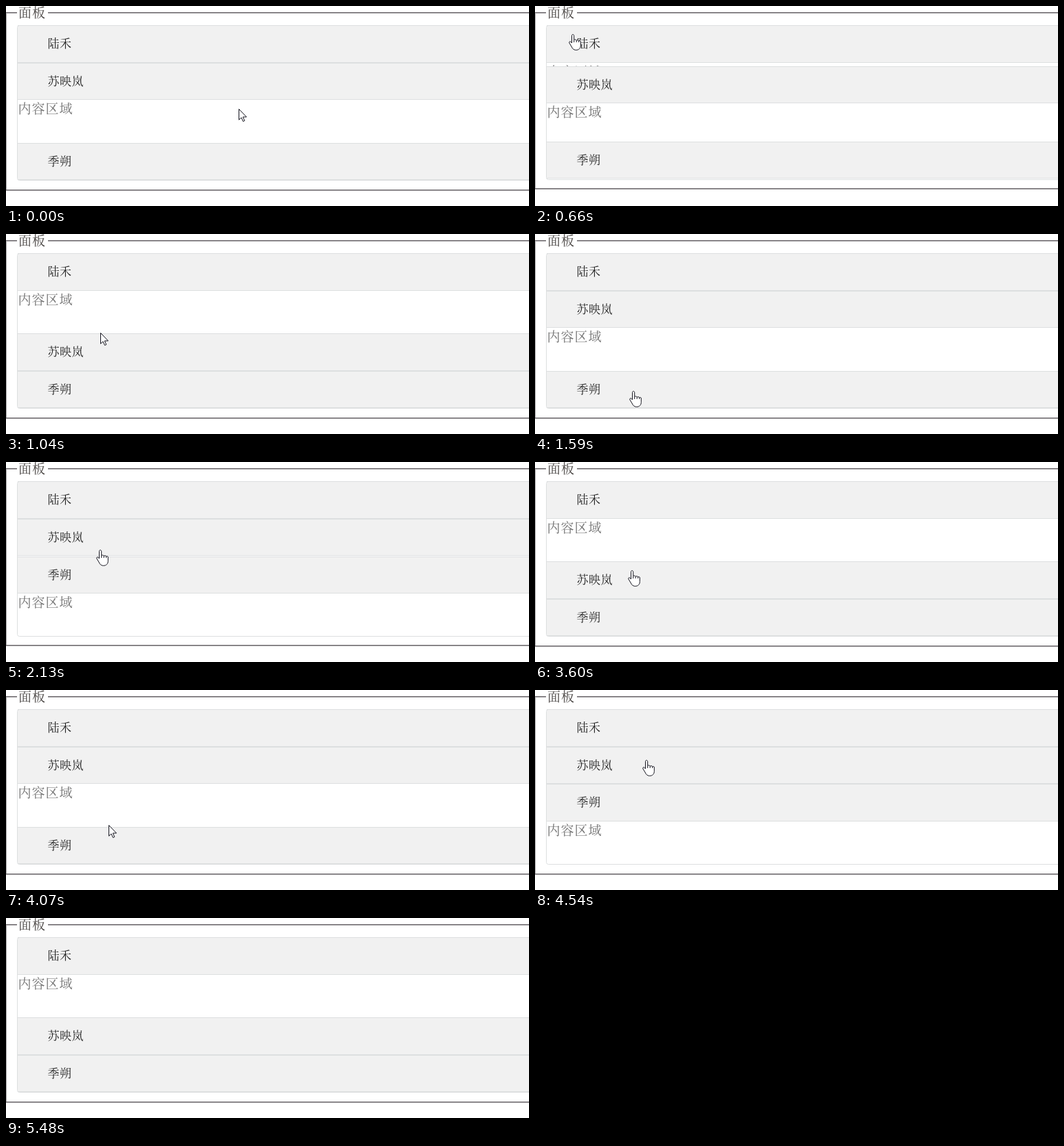
An HTML page that plays this animation: 760x292 px, repeating every 5.7 s.

```html
<!DOCTYPE html>
<html lang="zh-CN">
<head>
<meta charset="utf-8">
<title>面板</title>
<style>
html, body { margin: 0; width: 100%; height: 100%; overflow: hidden; background: #fff; }
#stage { display: block; width: 760px; height: 292px; }
text { font-family: "Noto Serif CJK SC", "Noto Sans CJK SC", "Noto Sans CJK", serif; }
.name { font-size: 17px; letter-spacing: .5px; fill: #222; }
.body { font-size: 19px; letter-spacing: 1px; fill: #707070; }
.legend { font-size: 19px; letter-spacing: 1px; fill: #4a4644; }
.rule { fill: #dddfe0; }
.dark { fill: #6b676b; }
.light { fill: #a9a7a9; }
.cursor path { fill: #fff; stroke: #14141e; stroke-linejoin: round; }
</style>
</head>
<body>
<svg id="stage" viewBox="0 0 760 292">
  <rect width="760" height="292" fill="#fff"/>
  <g shape-rendering="crispEdges">
    <rect id="left" class="light" y="10" width="1"/>
    <rect class="dark" y="9" width="760" height="1"/>
    <rect class="light" y="10" width="760" height="1"/>
    <rect x="16" y="9" width="45" height="2" fill="#fff"/>
    <g id="bottom">
      <rect class="dark" width="760" height="1"/>
      <rect class="light" y="1" width="760" height="1"/>
    </g>
  </g>
  <text class="legend" x="18" y="16.5">面板</text>
  <g id="panels"></g>
  <rect id="box" x="16.5" y="28.5" width="780" rx="3" fill="none" stroke="#dddfe0"/>
  <g id="arrow" class="cursor"><path d="M.5 .5V16.2L4 12.9L6.5 18.5L8.8 17.5L6.3 12H11.5Z"/></g>
  <g id="hand" class="cursor">
    <path transform="translate(-6 0)" d="M6 .6C5 .6 4.5 1.4 4.5 2.3V13L3 11.3C2.2 10.4 .9 11 .7 12C.6 12.6 1 13.3 1.5 14L4.5 19C5.5 21.5 7.5 23.3 10.5 23.3C15 23.3 17.3 20.5 17.3 16.5V11C17.3 9.4 15.2 9.2 14.6 10.2C14.6 8.6 12 8.2 11.2 9.4C11 7.8 8.4 7.6 7.7 8.6V2.3C7.7 1.4 7 .6 6 .6ZM7.7 8.6V12M11.2 9.4V12M14.6 10.2V12"/>
  </g>
</svg>
<script>
const LOOP = 5700, TICK = 77.7, SHIFT = 58;
const TOP = 28.7, ROW = 54.45, BODY = 62.5, SLIDE = 200, LAG = 6;
const names = ['陆禾', '苏映岚', '季朔'];

// the pointer clicks a panel open, then glides to the next title; times in ticks
const moves = [
  { click: 1, end: 5, open: 1, to: [55, 41] },
  { click: 8.4, end: 16, open: 0, to: [143, 151] },
  { click: 17.4, end: 24, open: 1, to: [143, 252] },
  { click: 25.6, end: 30, open: 2, to: [135, 92] },
  { click: 32.4, end: 36, open: 1, to: [142, 49] },
  { click: 39.4, end: 47, open: 0, to: [141, 158] },
  { click: 48.4, end: 55, open: 1, to: [150, 201] },
  { click: 56.4, end: 63, open: 2, to: [171, 30] },
  { click: 64.4, end: 71, open: 0, to: [205, 300] }
];
const rest = { click: 0, end: 1, open: 1, to: [338, 150] };

const $ = id => document.getElementById(id);
const clamp = v => Math.max(0, Math.min(1, v));
const set = (el, attrs) => { for (const k in attrs) el.setAttribute(k, attrs[k]); };
const show = on => on ? 'visible' : 'hidden';

function add(parent, tag, attrs, label) {
  const el = document.createElementNS('http://www.w3.org/2000/svg', tag);
  set(el, attrs);
  if (label) el.textContent = label;
  return parent.appendChild(el);
}

const panels = names.map(name => {
  const body = add($('panels'), 'svg', { x: 17, width: 743 });
  add(body, 'text', { class: 'body', x: .5, y: 20 }, '内容区域');
  const head = add($('panels'), 'g', {});
  const strip = { x: 17, width: 743, 'shape-rendering': 'crispEdges' };
  const fill = add(head, 'rect', { ...strip, fill: '#f1f1f1' });
  add(head, 'rect', { ...strip, class: 'rule', height: 1 });
  const rule = add(head, 'rect', { ...strip, class: 'rule', height: 1 });
  add(head, 'text', { class: 'name', x: 60.5, y: 33 }, name);
  return { body, head, fill, rule };
});

// CSS ease-in-out: cubic-bezier(.42, 0, .58, 1), solved by bisection
function ease(x) {
  x = clamp(x);
  let lo = 0, hi = 1;
  for (let i = 0; i < 24; i++) {
    const s = (lo + hi) / 2, r = 1 - s;
    if (1.26 * r * r * s + 1.74 * r * s * s + s * s * s < x) lo = s; else hi = s;
  }
  return lo * lo * (3 - 2 * lo);
}

const glide = p => 1 - Math.pow(1 - clamp(p), 2.15);

function sample(now) {
  const tick = Math.floor((now + SHIFT) / TICK);
  const n = moves.filter(m => m.click <= tick).length - 1;
  const move = moves[n] || rest, last = moves[n - 1] || rest;
  const start = Math.ceil(move.click);
  const p = glide((tick - start) / (move.end - start));
  const tip = last.to.map((v, i) => Math.round(v + (move.to[i] - v) * p));
  const age = (tick - move.click) * TICK;
  const sizes = names.map((_, i) => {
    if (move.open === last.open) return i === move.open ? BODY : 0;
    if (i === move.open) return BODY * ease((age - LAG) / SLIDE);
    return i === last.open ? BODY * (1 - ease(age / SLIDE)) : 0;
  });
  return { tip, sizes };
}

function draw(now) {
  const { tip: [x, y], sizes } = sample(now);
  let top = TOP, overHead = false;
  panels.forEach((p, i) => {
    const y0 = Math.floor(top), y1 = Math.floor(top + ROW), h = y1 - y0;
    set(p.head, { transform: `translate(0 ${y0})` });
    set(p.fill, { height: h });
    set(p.rule, { y: h - 1 });
    top += ROW + sizes[i];
    const size = Math.floor(top) - y1;
    set(p.body, { y: y1, height: size, visibility: show(size > 0) });
    if (y >= y0 && y < y1) overHead = true;
  });
  const end = Math.floor(top);
  set($('box'), { height: Math.floor(top + .4) - 28 });
  set($('left'), { height: end + 4 });
  set($('bottom'), { transform: `translate(0 ${end + 14})` });
  const transform = `translate(${x} ${y})`;
  set($('hand'), { transform, visibility: show(overHead) });
  set($('arrow'), { transform, visibility: show(!overHead) });
}

const begin = performance.now();
function frame() {
  draw((performance.now() - begin) % LOOP);
  requestAnimationFrame(frame);
}
draw(0);
requestAnimationFrame(frame);
</script>
</body>
</html>
```
